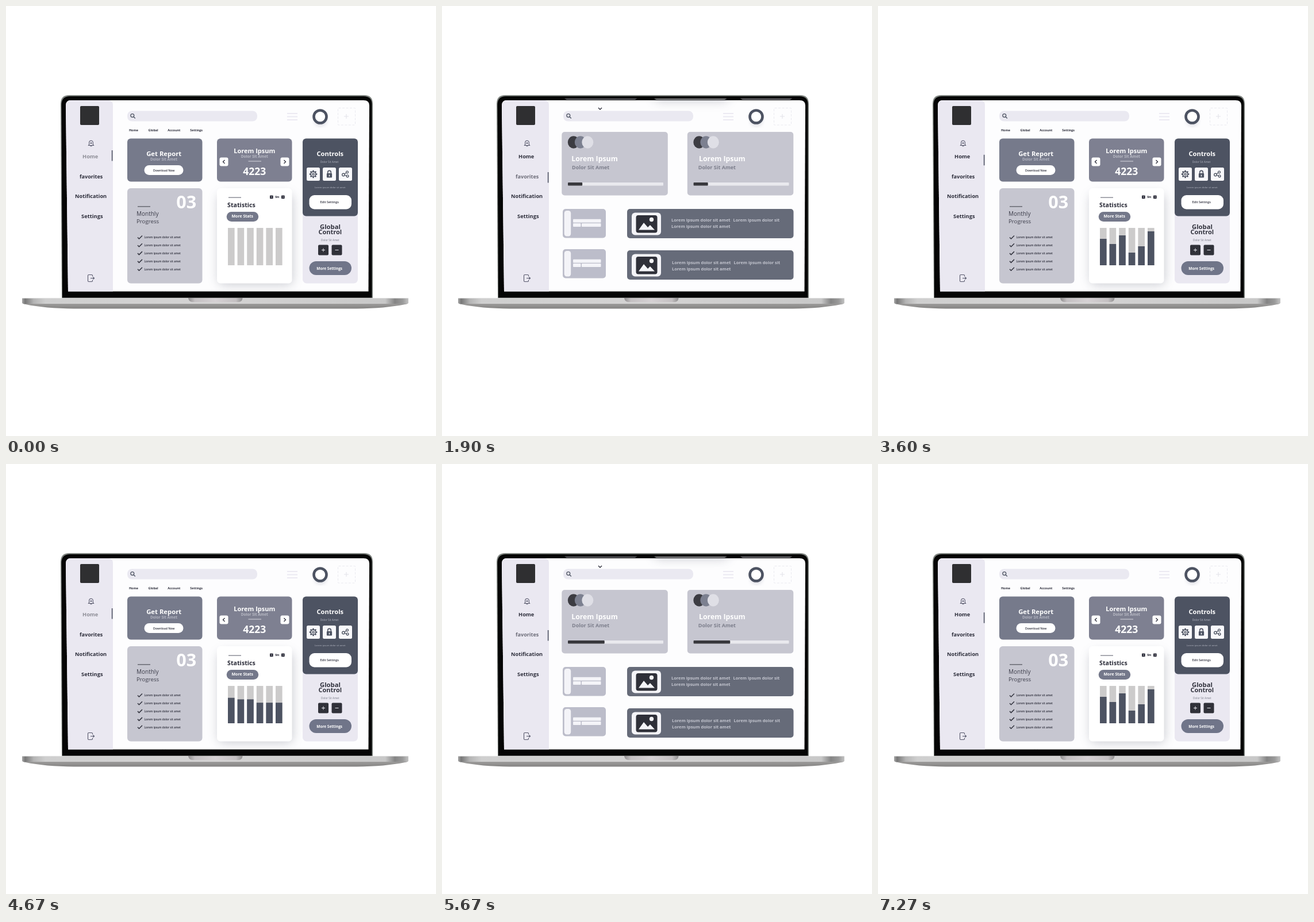
Recreate the animation shown at these times as an HTML page. Size 748x748 px, loop 7310 ms.

```html
<!DOCTYPE html>
<html lang="en">
<head>
<meta charset="utf-8">
<title>Dashboard on a laptop</title>
<style>
html, body { margin: 0; width: 100%; height: 100%; overflow: hidden; background: #fff; }
svg { display: block; width: 100vw; height: 100vh; font-family: "Open Sans", "Noto Sans", sans-serif; }
</style>
</head>
<body>
<svg id="stage" viewBox="0 0 748 748"></svg>
<script>
const PERIOD = 3655, SCROLL = 320;
const INK = '#2c2d3a', SLATE = '#4d5362', TRACK_W = 166;

// Drawing helpers
const rect = (x, y, w, h, fill, r = 0, more = '') =>
  `<rect x="${x}" y="${y}" width="${w}" height="${h}" rx="${r}" fill="${fill}" ${more}/>`;
const line = (d, color, width = 1, more = '') =>
  `<path d="${d}" fill="none" stroke="${color}" stroke-width="${width}" ${more}/>`;
const text = (str, x, y, size, fill = INK, weight = 700, anchor = 'start', more = '') =>
  `<text x="${x}" y="${y}" font-size="${size}" fill="${fill}" font-weight="${weight}" text-anchor="${anchor}" ${more}>${str}</text>`;
const mid = (str, x, y, size, fill, weight, more) => text(str, x, y, size, fill, weight, 'middle', more);
const dot = (x, y, r, fill, more = '') => `<circle cx="${x}" cy="${y}" r="${r}" fill="${fill}" ${more}/>`;
const at = (x, y, inner) => `<g transform="translate(${x} ${y})">${inner}</g>`;
const gradient = (id, stops, dir = 'x2="1"') =>
  `<linearGradient id="${id}" x1="0" y1="0" ${dir}>` +
  stops.map(([o, c]) => `<stop offset="${o}" stop-color="${c}"/>`).join('') + '</linearGradient>';

const defs = `<defs>
  ${gradient('metal', [[0, '#a9a9a9'], [.008, '#777'], [.03, '#b4b4b4'], [.06, '#cfcfcf'], [.5, '#d4d3d3'],
    [.94, '#c8c8c8'], [.965, '#858585'], [.985, '#9a9a9a'], [1, '#c4c4c4']])}
  ${gradient('under', [[0, '#b8b7b6'], [1, '#858483']], 'x2="0" y2="1"')}
  ${gradient('notch', [[0, '#908e8f'], [.12, '#c4c0c2'], [.5, '#d6d1d4'], [.88, '#c4c0c2'], [1, '#908e8f']])}
  <clipPath id="view">${rect(187, 161.5, 445, 335, '#000')}</clipPath>
  <filter id="soft" x="-40%" y="-40%" width="180%" height="180%"><feGaussianBlur stdDeviation="9"/></filter>
  <filter id="blur"><feGaussianBlur stdDeviation="3"/></filter>
</defs>`;

const laptop = `
  <path d="M97 509 L95 170 Q95 155 110 155 H623 Q638 155 638 170 V509Z" fill="#7f8480"/>
  <path d="M98 507.500 L96.500 171 Q97 157 111 157 H622 Q636.500 157 636.500 171 V507.500Z" fill="#050505"/>
  <path d="M108 496.500 L104 173 Q104 164 113 164 H218 H622 Q632 164 632 173 L630.500 496.500Z" fill="#fdfdfe"/>
  <path d="M28 508 H700 V516 Q699 518.500 694 519 Q660 526 610 526.500 H118 Q68 526 34 519 Q29 518.500 28 516Z" fill="url(#under)"/>
  <path d="M28 508 H700 V516 Q699 518 694 518 H34 Q29 518 28 516Z" fill="url(#metal)"/>
  ${line('M28 508.300 H700', '#e4e4e4', .8)}
  <path d="M317 508 H411.500 Q411 515 404 515 H325 Q318 515 317 508Z" fill="url(#notch)"/>`;

const bell = at(148, 239, line('M-3.300 2 V-1.500 A3.300 3.300 0 0 1 3.300 -1.500 V2 L4.500 3.500 H-4.500Z M-1.500 4.700 H1.500 M0 -5.500 V-4.800', '#55566a', 1.1) +
  dot(0, -.5, 1.3, '#55566a'));
const exit = at(148, 473.500, line('M2.500 -3 V-4.500 Q2.500 -6 1 -6 H-4 Q-5.500 -6 -5.500 -4.500 V4.500 Q-5.500 6 -4 6 H1 Q2.500 6 2.500 4.500 V3 M-1 0 H5.500 M3.500 -2 L5.500 0 L3.500 2', '#55566a', 1.1));

const sidebar = `
  <path d="M108 496.500 L104 173 Q104 164 113 164 H179 Q186 165 186 172 V496.500Z" fill="#eae8f1"/>
  ${rect(129, 174, 33, 33, '#2f2f31', 2)}
  ${bell}${exit}
  ${mid('Home', 146.7, 264.7, 9.2, INK, 700, 'id="home"')}
  ${mid('favorites', 148.2, 300, 9, INK, 700, 'id="fav"')}
  ${mid('Notification', 147.600, 333.500, 9.2)}
  ${mid('Settings', 149.800, 369.200, 9.3)}
  ${rect(183.8, 251, 1.7, 18.5, '#565a6b', 0, 'id="marker"')}`;

const header = `
  ${rect(211, 182.500, 226, 18, '#eae9f1', 8)}
  ${dot(219.800, 190.600, 2.900, 'none', `stroke="${SLATE}" stroke-width="1.3"`)}
  ${line('M222 192.800 L224.800 195.600', SLATE, 1.400)}
  ${line('M489 187 H507 M489 192.500 H507 M489 198 H507', '#eceaf2', 1.900)}
  ${dot(547, 198, 11, '#c9cad4', 'opacity=".6" filter="url(#blur)"')}
  ${dot(546.5, 192.500, 11, '#fff', `stroke="${SLATE}" stroke-width="4.6"`)}
  ${rect(577.500, 177.500, 30, 29.500, 'none', 1, 'stroke="#eaeaf0" stroke-dasharray="4 2.5"')}
  ${line('M588 192 H596 M592 188 V196', '#e4e4ea', 1.200)}`;

const nav = [['Home', 214], ['Global', 247.5], ['Account', 281.3], ['Settings', 320.3]]
  .map(([s, x]) => text(s, x, 217.8, 5.4)).join('');

const reportCard = rect(211, 230.500, 130.500, 75, '#767a8b', 6) +
  mid('Get Report', 274.700, 260.800, 11.300, '#fff') +
  mid('Dolor Sit Amet', 274.500, 269, 6.500, '#b3b5c1') +
  rect(240.500, 277, 68, 17, '#fff', 8.500) + mid('Download Now', 274.700, 287.500, 5.100, INK, 600);

const arrowButton = (x, dir) => rect(x - 7.500, 263.500, 15, 15, '#fff', 3) +
  line(`M${x - dir * 1.500} 268 L${x + dir * 1.500} 271 L${x - dir * 1.500} 274`, INK, 1.300);
const counterCard = rect(367, 230.500, 130.500, 75, '#7e8091', 6) +
  mid('Lorem Ipsum', 432.300, 255.800, 11, '#fff') +
  mid('Dolor Sit Amet', 432.300, 264, 6.500, '#b9bac5') +
  line('M421.500 270 H444', '#d8d8df', 1.100) +
  mid('4223', 432.200, 294, 17.500, '#fff') + arrowButton(379, -1) + arrowButton(485, 1);

const gear = Array.from({ length: 8 }, (_, i) => `<path d="M-1.500 -4.500 L-1 -6.800 H1 L1.500 -4.500Z" fill="${SLATE}" transform="rotate(${i * 45})"/>`).join('') +
  dot(0, 0, 4.300, 'none', `stroke="${SLATE}" stroke-width="1.4"`) + dot(0, 0, 1.700, 'none', `stroke="${SLATE}" stroke-width="1.3"`);
const lock = line('M-2.800 -1 V-3.300 A2.800 2.800 0 0 1 2.800 -3.300 V-1', SLATE, 1.600) +
  rect(-4.600, -1.500, 9.200, 7.500, SLATE, 1) + line('M0 1 V4', '#fff', 1.400);
const share = line('M-3.500 1 L3 -3.500 M-3.500 1 L3.500 3.500', SLATE, 1.300) +
  [[-3.500, 1, 2.300], [3, -3.500, 1.900], [3.500, 3.300, 1.900]].map(([x, y, r]) => dot(x, y, r, '#fff', `stroke="${SLATE}" stroke-width="1.4"`)).join('');
const controls = rect(516, 340, 96, 142.500, '#eae8f1', 7) + rect(516, 230.500, 96, 135, SLATE, 6) +
  mid('Controls', 563.800, 260.500, 11.100, '#fff') +
  mid('Dolor Sit Amet', 562.500, 273, 4.700, '#b4b7c2', 400) +
  [gear, lock, share].map((icon, i) => rect(523 + i * 28, 281, 23, 23, '#f8f8fb', 2.500) + at(534.500 + i * 28, 292.500, icon)).join('') +
  mid('Lorem ipsum dolor sit amet', 563.800, 317.300, 4.200, '#b4b7c2', 400) +
  rect(527.500, 329, 73.500, 24.500, '#fff', 9) + mid('Edit Settings', 562.700, 343.200, 5.400, INK, 600) +
  mid('Global', 564, 387.500, 11.300, '#33343f') + mid('Control', 563.800, 396.500, 11, '#33343f') +
  mid('Dolor Sit Amet', 563.800, 409, 4.700, '#777987', 400) +
  rect(543, 415.500, 18, 18, '#303139', 2) + rect(566.500, 415.500, 18, 18, '#303139', 2) +
  line('M549 424.500 H555 M552 421.500 V427.500 M572.500 424.500 H578.500', '#e8e8ee', 1) +
  rect(527.500, 444, 73.500, 24, '#707589', 12) + mid('More Settings', 562.700, 458.500, 6.500, '#fff');

const listItems = Array.from({ length: 5 }, (_, i) => at(0, i * 13.8,
  line('M229 402.500 L231.500 405 L237 399.500', '#33343f', 1.500) +
  text('Lorem ipsum dolor sit amet', 240.500, 404.400, 4.750, INK, 600))).join('');
const progressCard = rect(211, 317, 130.500, 165.500, '#c6c6d0', 6) +
  mid('03', 313.700, 352, 30.500, '#fff') + line('M229 348.800 H251', '#55565f', 1.200) +
  text('Monthly', 227, 364.800, 10, '#3c3d4a', 500) + text('Progress', 227, 378, 9.700, '#3c3d4a', 500) + listItems;

const BAR_TOP = 386, BAR_H = 65;
const bars = Array.from({ length: 6 }, (_, i) => {
  const x = 386 + i * 16.6;
  return rect(x, BAR_TOP, 11.6, BAR_H, '#cccbcb') + rect(x, BAR_TOP, 11.6, 0, SLATE, 0, 'class="bar"');
}).join('');
const statsCard = rect(369, 327, 130, 158, '#777a88', 10, 'opacity=".36" filter="url(#soft)"') +
  rect(367, 317, 130.500, 165.500, '#fff', 6) + line('M387 333.200 H409', '#777983', 1.200) +
  text('Statistics', 385, 349.800, 10.700) +
  rect(459, 329.500, 5.700, 5.700, INK, 1) + rect(479, 329.500, 5.700, 5.700, INK, 1) +
  line('M462.500 331 L461 332.300 L462.500 333.600 M481.200 331 L482.700 332.300 L481.200 333.600', '#fff', .7) +
  mid('6m', 471.800, 334, 4.700) +
  rect(383.700, 358, 55.500, 17, '#74788a', 8.500) + mid('More Stats', 411.300, 368.400, 7, '#fff') + bars;

const loremCard = (x, titleX, subX) => rect(x, 219, 184.500, 110.500, '#c6c6d0', 5) +
  [['#3c3c42', 20.500], ['#7c8090', 32.500], ['#dfdfe6', 45]].map(([c, dx]) =>
    `<ellipse cx="${x + dx}" cy="237" rx="10" ry="10.700" fill="${c}"/>`).join('') +
  text('Lorem Ipsum', titleX, 270, 12.300, '#fff') + text('Dolor Sit Amet', subX, 284, 9, '#7d7f8c') +
  rect(x + 10.700, 307, TRACK_W, 5.500, '#e9e9ee', 1) + rect(x + 10.700, 307, 0, 5.500, '#38383d', 1, 'class="meter"');

const smallCard = y => at(0, y, rect(210, 353, 75, 50.500, '#bcbdca', 5) + rect(212.700, 356, 11.500, 44.500, '#f4f4f8', 4.500) +
  rect(228, 370.700, 48.500, 6, '#f4f4f8', 1) + rect(228, 378, 13.500, 6, '#f4f4f8', 1) + rect(243, 378, 33.500, 6, '#f4f4f8', 1));

const phrase = 'Lorem ipsum dolor sit';
const wideCard = (y, dx) => at(0, y, rect(322, 353, 289.500, 51, '#666b79', 5) + rect(330, 359.500, 51, 39, '#f4f4f8', 6) +
  rect(337.500, 364, 37, 30.500, '#2f3039', 4) + dot(364.500, 371.500, 3.700, '#f4f4f8') +
  '<path d="M342 389.500 L351 377 L358 385 L362 381 L370 389.500Z" fill="#f4f4f8"/>' +
  at(dx, dx * 2, text(phrase + ' amet', 399, 374.800, 7.450, '#c3c5cf') + text(phrase, 506.500, 374.800, 7.400, '#c3c5cf') +
    text(phrase + ' amet', 399, 385.700, 7.450, '#c3c5cf')));

const favorites = line('M272 177 L275 180 L278 177', INK, 1.400) +
  loremCard(208.300, 225.200, 226) + loremCard(426.800, 447, 445.800) +
  smallCard(0) + smallCard(70) + wideCard(0, 0) + wideCard(72, 1);

const stage = document.getElementById('stage');
stage.innerHTML = `${defs}${rect(0, 0, 748, 748, '#fff')}${laptop}${sidebar}${header}
  <g clip-path="url(#view)"><g id="page">${nav}${statsCard}${reportCard}${counterCard}${progressCard}${controls}
  ${at(0, SCROLL, favorites)}</g></g>`;

const find = id => document.getElementById(id);
const page = find('page'), home = find('home'), fav = find('fav'), marker = find('marker');
const barFills = [...stage.querySelectorAll('.bar')], meters = [...stage.querySelectorAll('.meter')];

// Motion
const clamp = p => Math.min(1, Math.max(0, p));
const part = (t, from, to) => clamp((t - from) / (to - from));
const inOut = p => p < .5 ? 4 * p ** 3 : 1 - 4 * (1 - p) ** 3;
const linear = p => p;
function track(t, keys, ease = linear) {
  let value = keys[0][1];
  for (let i = 1; i < keys.length; i++) {
    const [t0, v0] = keys[i - 1], [t1, v1] = keys[i];
    if (t >= t0) value = v0 + (v1 - v0) * ease(part(t, t0, t1));
  }
  return value;
}
const blend = (a, b, p) => `rgb(${a.map((v, i) => Math.round(v + (b[i] - v) * p))})`;
const DARK = [44, 45, 58], HOME_GRAY = [141, 141, 150], FAV_GRAY = [108, 108, 120];

const lows = [26, 21, 21, 10, 10, 10], finals = [46, 37, 52, 22, 33, 59];
const meterLows = [114, 40], meterFinals = [132, 107];

function draw(time) {
  const t = time % PERIOD;
  const scroll = track(t, [[1540, 0], [1840, SCROLL], [3188, SCROLL], [3488, 0]], inOut);
  page.setAttribute('transform', `translate(0 ${-scroll})`);

  barFills.forEach((bar, i) => {
    const h = track(t, [[140, 0], [760, BAR_H], [1240, lows[i]], [1640, finals[i]]]);
    bar.setAttribute('y', BAR_TOP + BAR_H - h);
    bar.setAttribute('height', h);
  });
  meters.forEach((meter, i) => {
    const w = track(t, [[1825, 0], [2320, TRACK_W], [2700, meterLows[i]], [3100, meterFinals[i]]]);
    meter.setAttribute('width', w);
  });

  const moved = t < 3000 ? inOut(part(t, 1535, 1850))
    : track(t, [[3125, 1], [3300, .5], [3615, .19], [PERIOD, 0]]);
  marker.setAttribute('y', 251 + 38 * moved);
  home.setAttribute('fill', blend(HOME_GRAY, DARK, part(t, 1500, 1700)));
  fav.setAttribute('fill', blend(DARK, FAV_GRAY, t < 3000 ? part(t, 1560, 1840) : 1 - part(t, 3300, 3560)));
}

let start;
function tick(now) {
  start ??= now;
  draw(now - start);
  requestAnimationFrame(tick);
}
draw(0);
requestAnimationFrame(tick);
</script>
</body>
</html>
```
